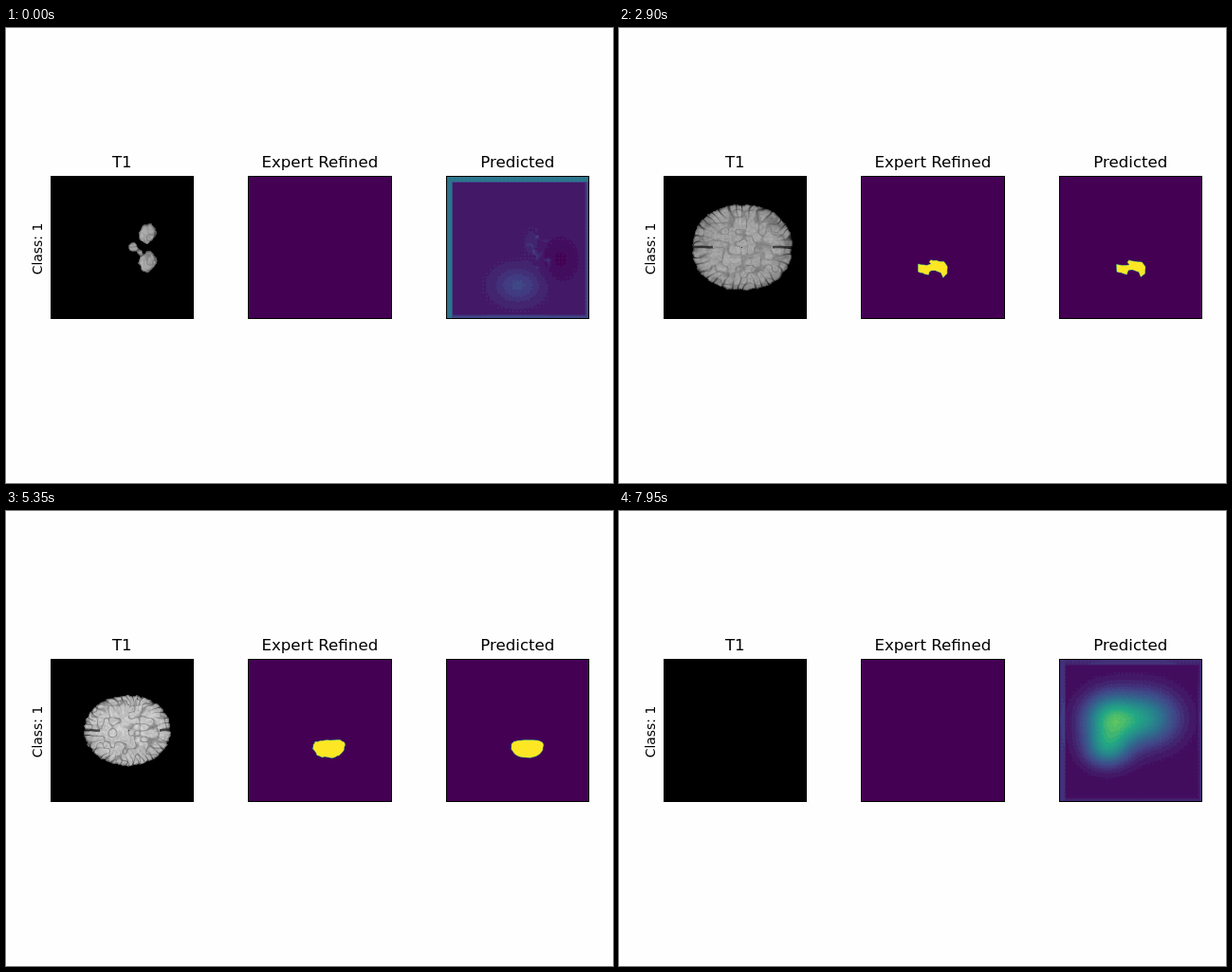
An HTML page with a canvas that plays this animation: 640 px wide and 480 px high, repeating every 8000 ms.

```html
<!DOCTYPE html>
<html lang="en">
<head>
<meta charset="utf-8">
<title>Slices</title>
<style>
html, body { margin: 0; width: 100%; height: 100%; overflow: hidden; background: #fefefe; }
canvas { display: block; }
</style>
</head>
<body>
<canvas id="stage" width="640" height="480"></canvas>
<script>
const ctx = document.getElementById('stage').getContext('2d');
const N = 151, TOP = 156, MID = 75;
const SCAN = 47, EXPERT = 255, PREDICTED = 464;
const DARK = '#440154', TEAL = '#21918c', YELLOW = '#fde725';
const buf = document.createElement('canvas');
buf.width = buf.height = N;
const bctx = buf.getContext('2d');
const img = bctx.createImageData(N, N);

const clamp = (v, a = 0, b = 1) => Math.max(a, Math.min(b, v));
const lerp = (a, b, t) => a + (b - a) * t;
const ramp = (s, a, b) => clamp((s - a) / (b - a));
const bump = (s, a, b) => Math.sin(ramp(s, a, b) * Math.PI);

// Interpolate rows whose first entry is the slice number.
function keyed(rows, s) {
  let i = 0;
  while (i < rows.length - 2 && s >= rows[i + 1][0]) i++;
  const a = rows[i], b = rows[i + 1], t = ramp(s, a[0], b[0]);
  return a.slice(1).map((v, j) => lerp(v, b[j + 1], t));
}

function hash(x, y, z) {
  let h = Math.imul(x, 374761393) ^ Math.imul(y, 668265263) ^ Math.imul(z, 1274126177);
  h = Math.imul(h ^ (h >>> 13), 1103515245);
  return ((h ^ (h >>> 16)) >>> 0) / 2 ** 32;
}
function noise(x, y, z) {
  const i = Math.floor(x), j = Math.floor(y), k = Math.floor(z);
  const ease = v => v * v * (3 - 2 * v);
  const u = ease(x - i), v = ease(y - j);
  const face = n => lerp(
    lerp(hash(i, j, n), hash(i + 1, j, n), u),
    lerp(hash(i, j + 1, n), hash(i + 1, j + 1, n), u), v);
  return lerp(face(k), face(k + 1), ease(z - k));
}

// Depth inside a shape in pixels; negative outside.
function ellipse(x, y, cx, cy, rx, ry, tilt = 0) {
  if (rx <= 0 || ry <= 0) return -99;
  const c = Math.cos(tilt), n = Math.sin(tilt), dx = x - cx, dy = y - cy;
  return (1 - Math.hypot((dx * c + dy * n) / rx, (dy * c - dx * n) / ry)) * Math.min(rx, ry);
}

// slice, left reach, right reach, half height, roundness
const OUTLINE = [
  [44, 37, 54, 43.5, 2.2],
  [58, 52, 53, 45, 2.2],
  [72, 52, 53, 45, 2.2],
  [91, 54, 50, 43, 2.3],
  [122, 41, 39, 32, 1.75],
  [152, 1, 1, 1, 2]
];
const TONE = [[0, 175], [26, 220], [44, 172], [72, 178], [91, 198], [122, 225]];

function cerebellum(x, y, k) {
  const a = Math.atan2(y - MID, x - 103);
  const r = 29 - 6.5 * Math.cos(2 * a) - 9 * Math.exp(-30 * a * a);
  return r * k - Math.hypot(x - 103, y - MID);
}

function scanShape(s) {
  const [left, right, high, power] = keyed(OUTLINE, s);
  const g = ramp(s, 0, 26), c = ramp(s, 34, 44), shut = ramp(s, 44, 58);
  const pole = ramp(s, 18, 26) + ramp(s, 26, 38) * 0.8;
  const k = s < 26 ? (s - 6) / 20 : 1 + (s - 26) / 80;
  const notchX = s < 44 ? lerp(45, 18, c) : lerp(18, 0, shut);
  return (x, y) => {
    let d = -99;
    if (s < 46) {
      const low = y > MID, fy = low ? y : 150 - y;
      d = Math.max(
        ellipse(x, y, 87 + 3 * g, MID, 5 + 5 * g, 5 + 5 * g),
        ellipse(x, fy, 102 + 3 * g, 90, 9 + 7 * g, 11 + 5 * g, low ? 0.3 : -0.3),
        ellipse(x, y, 94, 81, 5, 2.5, 0.5),
        cerebellum(x, y, k),
        ellipse(x, fy, 67, 97.5, 6 * pole, 9 * pole, -0.35));
    }
    if (s > 34) {
      const dx = x - 82, dy = y - MID;
      const q = (Math.abs(dx) / (dx < 0 ? left : right)) ** power + (Math.abs(dy) / high) ** power;
      const r = Math.hypot(dx, dy);
      const size = r / Math.max(q ** (1 / power), 0.01);
      const o = size * lerp(0.8, 1, c) - r;
      d = Math.max(d, Math.min(o,
        -ellipse(x, y, 60 - 6 * c - 20 * shut, MID, notchX, notchX * 0.7)));
    }
    return d;
  };
}

function scanTone(s, x, y, d, tone) {
  const z = s / 9, top = ramp(s, 104, 116);
  const a = Math.atan2(y - MID, x - 82);
  const soft = noise(x / 12, y / 12, z);
  let v = tone * (0.8 + 0.14 * noise(x / 2, y / 2, s) + 0.12 * soft);
  const ridge = Math.abs(noise(x / 6.5, y / 6.5, z + 40) - 0.5);
  v *= 1 - clamp(1 - ridge / 0.12) * lerp(0.2, 0.56, top);
  if (s > 38) {
    const fold = clamp(1 - Math.abs(Math.sin(a * 17 + 6 * soft)) * 1.8);
    v *= 1 - (0.16 + fold * 0.7) * Math.exp(-d / 8) * (1 - top * 0.5);
  }
  const early = s < 36;
  if (s > 14 && s < 54 && ellipse(x, y, 100, MID, early ? 30 : 15, early ? 38 : 18) > 0) {
    const r = Math.hypot(x - 92, y - MID);
    if (r > 11) v *= 1 - (early ? 0.1 : 0.26) * (1 + Math.sin(r * 1.6 + soft * 4));
  }
  if (s > 16 && early && ellipse(x, y, 96, 76, 6, 7) > 0) v *= 0.5;
  if (s > 38 && s < 56) {
    const stem = ellipse(x, y, 82, MID, 12, 12);
    if (stem > 1) v = tone * (0.9 + 0.1 * soft);
    else if (stem > -1.5) v *= 0.6;
  }
  const gap = Math.abs(y - 76 + 2 * noise(x / 8, 3, z));
  if (s > 108 || s > 56 && Math.abs(x - 83) > 31) v *= 1 - 0.6 * clamp(1.8 - gap);
  if (s > 58 && s < 80) {
    if (ellipse(x, y, 100, 60, 6, 3, -0.5) > 0 || ellipse(x, y, 102, 88, 5, 2, 0.6) > 0) v *= 0.4;
    if (ellipse(x, y, 102, 74, 10, 12) > 0) v *= 0.86;
  }
  if (s > 58 && s < 106) {
    const open = bump(s, 78, 106);
    const bend = (x - 74) ** 2 / 90;
    const up = ellipse(x, y, 74, 66 - bend, 15, 4 * open);
    const low = ellipse(x, y, 75, 78 + bend, 18, 3.5 * open);
    if (Math.max(up, low) > 0) v *= 0.38;
    v *= 1 - 0.16 * clamp(ellipse(x, y, 82, 93, 25, 14) / 4);
  }
  return v * clamp(0.4 + d / 3.2);
}

function drawScan(s) {
  const depth = scanShape(s), tone = keyed(TONE, s)[0];
  paint(SCAN, (x, y) => {
    let d = s > 152 ? -9 : depth(x, y);
    if (d > -3) d += 2.4 * (noise(x / 3.5, y / 3.5, s / 6) - 0.5);
    const v = d > 0 ? scanTone(s, x, y, d, tone) : 0;
    return [v, v, v];
  });
}

const VIRIDIS = ['440154', '414487', '2a788e', '22a884', '7ad151', 'fde725']
  .map(h => h.match(/../g).map(c => parseInt(c, 16)));
function viridis(v) {
  v = clamp(Math.round(v / 0.035) * 0.035) * 5;
  const i = Math.min(4, Math.floor(v));
  return VIRIDIS[i].map((c, j) => lerp(c, VIRIDIS[i + 1][j], v - i));
}

// slice, base, top, left, far edges, then blobs: x, y, rx, ry, height
const EARLY = [
  [0, .07, .33, .31, .13, 75, 115, 24, 18, .13, 90, 70, 10, 16, .03, 120, 88, 18, 22, -.06],
  [26, .07, .16, .22, .12, 80, 105, 28, 17, .22, 100, 101, 9, 6, .07, 132, 90, 26, 45, -.07]
];
const LATE = [
  [121, 0, .07, .1, .02, 46, 58, 25, 36, .11, 93, 93, 27, 18, .2, 80, 56, 42, 38, .11],
  [159, .02, .1, .12, .08, 53, 64, 28, 27, .55, 50, 95, 23, 19, .35, 92, 62, 33, 28, .42]
];

function drawField(s) {
  const [base, top, left, far, ...blobs] = keyed(s < 60 ? EARLY : LATE, s);
  const depth = scanShape(s);
  if (s < 60) blobs[4] += 0.2 * ramp(s, 26, 40);
  paint(PREDICTED, (x, y) => {
    let v = base;
    for (let i = 0; i < blobs.length; i += 5) {
      const [bx, by, rx, ry, h] = blobs.slice(i, i + 5);
      v += h * Math.exp(-(((x - bx) / rx) ** 2) - ((y - by) / ry) ** 2);
    }
    v = Math.max(0, v);
    if (s < 150 && depth(x, y) > 0) {
      v += (s < 12 ? 0.24 : 0.05) * Math.max(0, noise(x / 4, y / 4, s / 4) - 0.55);
    }
    if ((x >> 1) & (y >> 1) & 1) v += 0.008;
    const edge = Math.max(top * clamp((7 - y) / 2), left * clamp((7 - x) / 2),
      far * clamp((Math.max(x, y) - 145) / 3));
    return viridis(v + edge);
  });
}

const ARCH = [[54, 88], [65, 91], [80, 91], [74, 85], [75, 80], [84, 83], [100, 84], [107, 92],
  [106, 105], [98, 109], [95, 98], [83, 93], [76, 94], [74, 104], [63, 101], [55, 101]];

// Broad rounded form, flat on top and tapering downwards.
function fullPoint(i) {
  const a = Math.PI * (1.08 + i / 8), c = Math.cos(a), n = Math.sin(a);
  const y = n > 0 ? 93 + 16 * n ** 0.8 : 93 - 11 * Math.sqrt(-n);
  return [81 + 25 * Math.sign(c) * Math.abs(c) ** 0.8 * (1 - 0.15 * Math.max(0, n)), y];
}

function maskPoints(s, rough) {
  const seed = rough ? 0.22 : 0.17, shake = rough ? 1.8 : 0.6;
  const centre = [88, 92];
  const pts = ARCH.map((arch, i) => {
    const full = fullPoint(i);
    const start = [70 + (full[0] - 81) * seed, 100 + (full[1] - 95) * seed * 1.6];
    return arch.map((v, k) => {
      v = s < 72 ? lerp(start[k], v, ramp(s, 44, 72)) : lerp(v, full[k], ramp(s, 72, 91));
      if (!k) v += 3 * ramp(s, 91, 101);
      return lerp(v, centre[k], ramp(s, 102, 118));
    });
  });
  // Split each side and shake the corners.
  return pts.flatMap((p, i) => {
    const q = pts[(i + 1) % pts.length];
    return [0, 0.5].map((t, j) => p.map((v, k) =>
      lerp(v, q[k], t) + shake * (hash(2 * i + j, s >> 1, k + 1) - 0.5)));
  });
}

function drawMask(left, s, rough) {
  ctx.fillStyle = DARK;
  ctx.fillRect(left, TOP, N, N);
  if (s < 42 || s >= 118) return;
  ctx.save();
  ctx.translate(left + 0.5, TOP + 0.5);
  ctx.beginPath();
  for (const p of maskPoints(s, rough)) ctx.lineTo(...p);
  ctx.closePath();
  ctx.lineJoin = 'round';
  ctx.strokeStyle = TEAL;
  ctx.stroke();
  ctx.fillStyle = YELLOW;
  ctx.fill();

  const hole = bump(s, 78, 104) * (rough ? 4.5 : 2.5);
  if (hole > 0) {
    ctx.fillStyle = DARK;
    ctx.beginPath();
    ctx.ellipse(83.5, 101, hole, hole * 0.72, 0.2, 0, 7);
    ctx.fill();
  }
  ctx.fillStyle = TEAL;
  if (rough && s > 60 && s < 84) {
    for (let i = 0; i < 20; i++) {
      ctx.fillRect(75 + Math.floor(17 * hash(i, s, 5)), 93 + Math.floor(14 * hash(i, s, 6)), 1 + i % 2, 1);
    }
  } else if (rough && s < 54) {
    ctx.fillRect(73, 104, 2, 2);
    ctx.fillRect(77, 105, 2, 1);
  } else if (!rough && s > 62 && s < 78) {
    ctx.fillStyle = YELLOW;
    ctx.fillRect(79, 97, 3, 2);
  }
  ctx.restore();
}

function paint(left, shade) {
  for (let y = 0, i = 0; y < N; y++) {
    for (let x = 0; x < N; x++, i += 4) {
      const c = shade(x, y);
      for (let k = 0; k < 3; k++) img.data[i + k] = c[k];
      img.data[i + 3] = 255;
    }
  }
  bctx.putImageData(img, 0, 0);
  ctx.drawImage(buf, left, TOP);
}

function drawFrame(left, width, title) {
  ctx.strokeRect(left + 0.5, TOP + 0.5, width, 150);
  ctx.fillText(title, left + width / 2 + 0.3, 147);
}

function draw(s) {
  ctx.fillStyle = '#fefefe';
  ctx.fillRect(0, 0, 640, 480);
  drawScan(s);
  drawMask(EXPERT, s, true);
  if (s < 40 || s >= 120) drawField(s);
  else drawMask(PREDICTED, s, false);

  ctx.fillStyle = ctx.strokeStyle = '#000';
  ctx.textAlign = 'center';
  ctx.font = '16.67px "DejaVu Sans", sans-serif';
  drawFrame(SCAN, 150, 'T1');
  drawFrame(EXPERT, 151, 'Expert Refined');
  drawFrame(PREDICTED, 150, 'Predicted');
  ctx.save();
  ctx.translate(37.5, 233);
  ctx.rotate(-Math.PI / 2);
  ctx.font = '13.89px "DejaVu Sans", sans-serif';
  ctx.fillText('Class: 1', 0, 0);
  ctx.restore();
}

let shown = -1;
function tick() {
  const s = Math.floor((performance.now() % 8000) / 50);
  if (s !== shown) draw(shown = s);
  requestAnimationFrame(tick);
}
tick();
</script>
</body>
</html>
```
